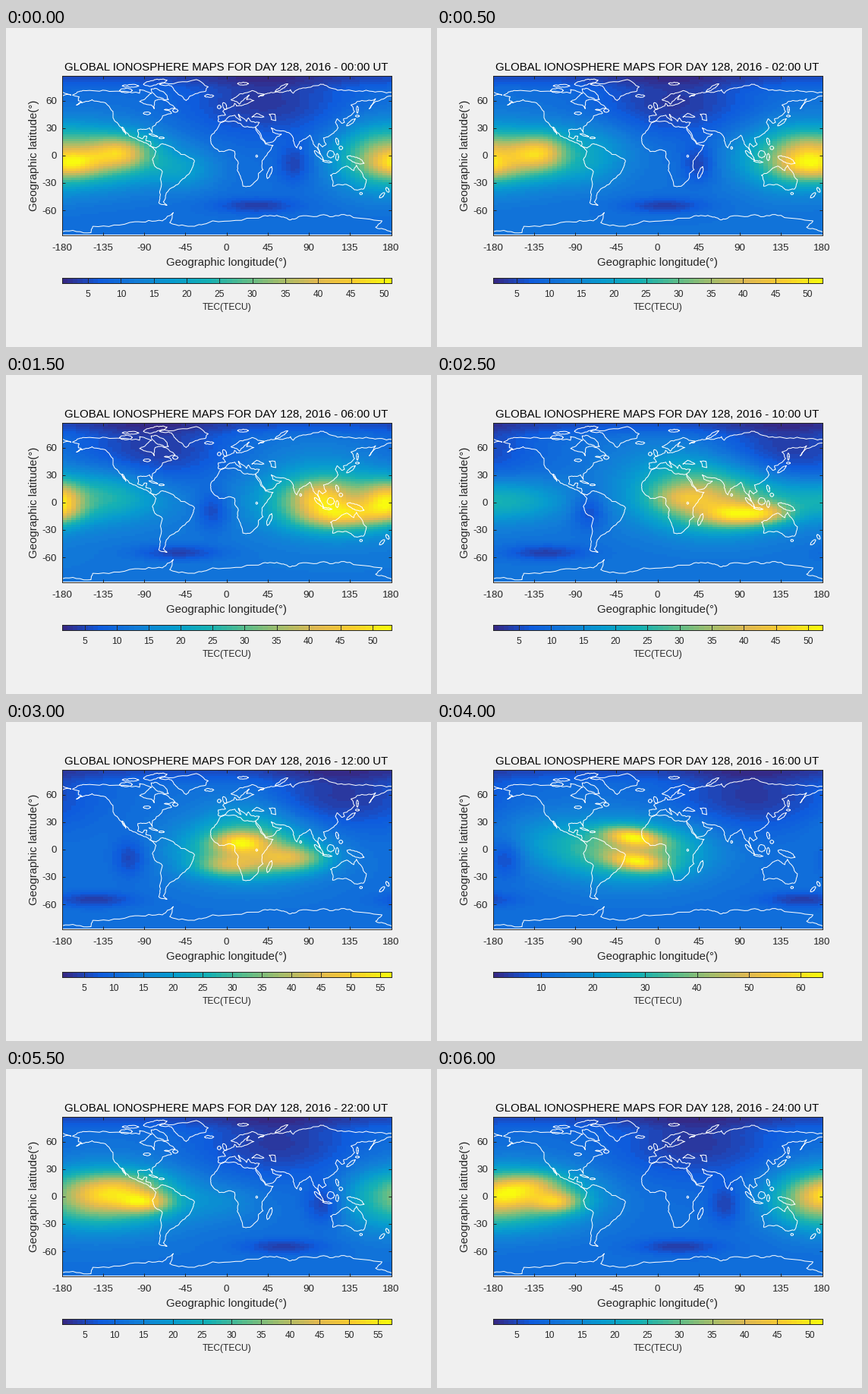
A matplotlib script that plays this animation: 560x420 px, repeating every 6.5 s.

```python
import numpy as np
import matplotlib.pyplot as plt
from matplotlib.animation import FuncAnimation
from matplotlib.colors import LinearSegmentedColormap

W, H, DPI = 560, 420, 100
PX = 72 / DPI
LEFT, RIGHT, TOP, BOTTOM = 73.5, 507.5, 62.5, 272.5
BAR_TOP, BAR_BOTTOM = 328.5, 335.5
INK = "#262626"
plt.rcParams["font.family"] = "Liberation Sans"

PARULA = ["#352a87", "#0f5cdd", "#127dd8", "#079ccf", "#15b1b4",
          "#59bd8c", "#a5be6b", "#e1b952", "#fcce2e", "#f9fb0e"]
CMAP = LinearSegmentedColormap.from_list("parula", PARULA, N=64)

# Colour limits in TECU and longitudes of the moving regions at these hours
HOURS = [0, 4, 10, 12, 16, 20, 24]
LOW = [1.0, 1.6, 0.9, 1.2, 0.7, 0.8, 1.3]
HIGH = [51.1, 53.3, 52.2, 56.8, 64.1, 62.5, 51.9]
DAY = [-145, -215, -300, -340, -385, -460, -505]
NIGHT = [40, -10, -225, -238, -260, -295, -320]
STRIP = [30, -20, -125, -148, -205, -262, -340]
TILT = [0, 0, 0, 0, -.12, 0, 0]

# Crests at each hour: longitude, latitude, two spreads, height
CRESTS = [
    [(-172, -11, 22, 10, 30), (-118, 1, 22, 12, 36),
     (160, -4, 32, 25, 28), (-50, -18, 26, 15, 14)],
    [(-156, 1, 18, 14, 56), (130, 6, 18, 12, 24),
     (142, -17, 28, 10, 32), (-105, 8, 35, 20, 24)],
    [(85, -16, 26, 9, 36), (120, -14, 18, 8, 24), (22, 3, 22, 10, 16),
     (-170, 0, 45, 16, 22), (30, 25, 50, 25, 18)],
    [(12, 6, 20, 8, 36), (0, -20, 24, 8, 28),
     (70, -12, 26, 10, 36), (20, 30, 35, 22, 10)],
    [(-30, 12, 22, 7, 46), (-24, -16, 22, 7, 42), (-110, 5, 45, 22, 14)],
    [(-68, -8, 16, 8, 34), (-85, -7, 30, 11, 18), (-110, 12, 40, 10, 14),
     (25, -8, 28, 14, 14), (180, -5, 20, 25, 18)],
    [(-112, -8, 18, 8, 38), (-140, 12, 25, 9, 24),
     (-168, 0, 24, 10, 20), (165, -5, 32, 22, 32)],
]

LON, LAT = np.meshgrid(np.arange(-180, 180, 5), np.arange(-87.5, 87.5, 2.5))


def bump(lon, lat, wide, tall, height, tilt=0):
    dx = (LON - lon + 180) % 360 - 180
    dy = LAT - lat - tilt * dx
    return height * np.exp(-((dx / wide) ** 2 + (dy / tall) ** 2) / 2)


def crests(k, drift):
    """Crests of hour number k, carried west by drift degrees."""
    return sum(bump(lon - drift, *rest, TILT[k])
               for lon, *rest in CRESTS[k])


def tec(hour):
    """Relative electron content; the crests follow the sun."""
    k = min(np.searchsorted(HOURS, hour, "right") - 1, len(HOURS) - 2)
    start, end = HOURS[k], HOURS[k + 1]
    mix = (hour - start) / (end - start)
    total = (18 + (1 - mix) * crests(k, 15 * (hour - start))
             + mix * crests(k + 1, 15 * (hour - end)))
    day, night, strip = (np.interp(hour, HOURS, track)
                         for track in (DAY, NIGHT, STRIP))
    total += bump(day, -3, 50, 22, 42)
    total += bump(night, 56, 62, 26, -14)
    total += bump(strip, -57, 32, 6, -13)
    total += bump(72 - 15 * hour, -11, 13, 15, -12)
    total -= 10 * np.exp(-((LAT - 86) / 12) ** 2)
    total = np.maximum(total, 0)
    return total / total.max()


fig = plt.figure(figsize=(W / DPI, H / DPI), dpi=DPI, facecolor="#f0f0f0")
rng = np.random.default_rng(4)


def pixel_axes(top, bottom):
    ax = fig.add_axes([LEFT / W, 1 - bottom / H, (RIGHT - LEFT) / W,
                       (bottom - top) / H])
    ax.tick_params(direction="in", top=True, right=True, length=4.3 * PX,
                   width=PX, color=INK, labelbottom=False, labelleft=False)
    for side in ax.spines.values():
        side.set(linewidth=PX, color=INK)
    return ax


def put(x, y, text, size, color=INK, ha="center", va="baseline", **kw):
    return fig.text(x / W, 1 - y / H, text, fontsize=size * PX, color=color,
                    ha=ha, va=va, **kw)


world = pixel_axes(TOP, BOTTOM)
image = world.imshow(tec(0), cmap=CMAP, vmin=0, vmax=1, origin="lower",
                     extent=(-180, 180, -87.5, 87.5), aspect="auto",
                     interpolation="nearest")


def coast(points):
    """Draw a shore, roughened by shifting midpoints sideways."""
    line = np.reshape(points, (-1, 2)).astype(float)
    for _ in range(3):
        step = np.diff(line, axis=0)
        side = np.column_stack([-step[:, 1], step[:, 0]])
        size = np.hypot(*step.T)[:, None] + 1e-9
        shift = rng.uniform(-1, 1, size.shape) * np.minimum(.13, 1.2 / size)
        mids = line[:-1] + step / 2 + side * shift
        rough = np.empty((2 * len(line) - 1, 2))
        rough[::2], rough[1::2] = line, mids
        line = rough
    world.plot(*line.T, color="white", lw=PX)


def island(lon, lat, rx, ry, turn):
    a = np.linspace(0, 2 * np.pi, 9)
    x, y, t = rx * np.cos(a), ry * np.sin(a), np.radians(turn)
    coast(np.column_stack([lon + x * np.cos(t) - y * np.sin(t),
                           lat + x * np.sin(t) + y * np.cos(t)]))


# North America, Arctic to Panama
coast([-168, 66, -157, 71, -128, 70, -95, 68, -95, 72, -82, 68, -87, 64,
       -95, 59, -82, 55, -79, 51, -78, 60, -70, 61, -65, 59, -56, 52, -68, 50,
       -60, 46, -70, 43, -76, 36, -81, 31, -81, 25, -84, 30, -97, 28, -97, 20,
       -92, 18, -90, 21, -87, 21, -88, 16, -83, 15, -83, 10, -77, 8])
# South America
coast([-77, 8, -72, 12, -62, 10, -50, 1, -35, -6, -39, -17, -48, -26, -58, -35,
       -66, -42, -69, -51, -65, -55, -74, -52, -73, -40, -70, -18, -76, -14,
       -81, -5, -77, 4, -80, 8])
# Pacific shore, Panama to Alaska
coast([-80, 8, -87, 13, -95, 16, -106, 21, -114, 31, -110, 23, -118, 34,
       -124, 41, -124, 48, -134, 58, -147, 61, -154, 59, -164, 55, -158, 58,
       -162, 60, -161, 64, -168, 66])
# Africa
coast([32, 31, 20, 31, 10, 37, -6, 36, -17, 21, -17, 14, -8, 4, 4, 6, 9, 4,
       9, -1, 13, -9, 12, -17, 18, -34, 26, -34, 35, -24, 35, -20, 40, -16,
       39, -6, 51, 11, 43, 12, 37, 20, 32, 30])
# Southern and eastern Asia
coast([32, 30, 43, 13, 52, 16, 60, 23, 51, 25, 49, 30, 57, 27, 67, 25, 73, 19,
       77, 8, 80, 15, 91, 22, 94, 16, 98, 9, 103, 1, 100, 9, 101, 13, 105, 9,
       109, 12, 106, 19, 115, 23, 122, 30, 119, 36, 121, 40, 126, 35, 129, 36,
       128, 40, 140, 48, 136, 55, 143, 59, 163, 62, 156, 51, 163, 59, 180, 65])
# Arctic shore and Europe
coast([180, 69, 160, 70, 130, 71, 113, 74, 103, 78, 81, 73, 73, 68, 70, 72,
       60, 69, 45, 68, 35, 64, 41, 67, 28, 71, 14, 67, 5, 61, 11, 59, 14, 56,
       18, 60, 25, 66, 22, 61, 30, 60, 21, 56, 11, 54, 9, 57, 8, 54, -4, 48,
       -1, 44, -9, 43, -9, 37, -5, 36, 4, 43, 9, 44, 16, 38, 13, 45, 22, 37,
       24, 41, 27, 37, 36, 36, 32, 31])
coast([-180, 65, -170, 66, -180, 69])
# Black Sea and Caspian Sea
coast([28, 42, 33, 46, 41, 42, 32, 42, 28, 42])
coast([47, 45, 53, 45, 54, 38, 49, 39, 47, 45])
# Greenland, Australia, Antarctica
coast([-73, 78, -33, 83, -20, 75, -23, 70, -40, 65, -44, 60, -53, 67, -60, 76,
       -73, 78])
coast([114, -22, 116, -34, 131, -32, 140, -38, 150, -37, 153, -27, 142, -11,
       139, -17, 131, -12, 122, -18, 114, -22])
coast([-180, -84, -148, -85, -146, -78, -100, -73, -70, -72, -58, -63, -62, -74,
       -35, -78, -15, -72, 35, -69, 55, -66, 69, -71, 80, -67, 110, -66,
       135, -66, 170, -72, 163, -79, 180, -84])

# Islands and lakes: centre, half axes, turn
ISLANDS = [
    (-2, 54, 2, 4, 20), (-8, 53, 2, 2, 0), (-19, 65, 5, 1.5, 0),
    (47, -19, 2, 7, -20), (176, -38, 1.5, 3, 30), (170, -44, 1.5, 4, -45),
    (136, 36, 6, 1.5, 40), (143, 43, 2, 1, 0), (143, 50, 1, 4, 0),
    (101, 0, 7, 1.7, -45), (110, -7, 5, .8, -8), (114, 1, 4, 4, 0),
    (121, -2, 1.5, 4, 0), (141, -5, 10, 3, -22), (121, 15, 1.5, 4, 15),
    (125, 8, 2, 2, 0), (81, 8, 1, 1.5, 0), (-80, 22, 5, .8, -18),
    (-71, 19, 3, 1, 0), (-56, 49, 3, 2, 0), (-73, 67, 11, 4, -32),
    (-110, 71, 7, 2.5, 0), (-78, 80, 13, 3, 10), (-105, 76, 9, 1.5, 0),
    (18, 78.5, 6, 1.5, 0), (60, 74, 8, 1.5, 32), (147, -42, 1.5, 1.2, 0),
    (-87, 46, 4, 1.5, 0), (33, -1, 1, 1.2, 0)]
for place in ISLANDS:
    island(*place)

world.set(xlim=(-180, 180), ylim=(-87.5, 87.5),
          xticks=range(-180, 181, 45), yticks=range(-60, 61, 30))
for lon in range(-180, 181, 45):
    put(LEFT + (lon + 180) * (RIGHT - LEFT) / 360, 293, str(lon), 13.33)
for lat in range(-60, 61, 30):
    put(67, 172.5 - lat * (BOTTOM - TOP) / 175, str(lat), 13.33, ha="right")

bar = pixel_axes(BAR_TOP, BAR_BOTTOM)
bar.imshow(np.arange(64)[None, :], cmap=CMAP, extent=(0, 1, 0, 1),
           aspect="auto", interpolation="nearest")
bar.tick_params(length=3.5 * PX)
bar.set_yticks([])

title = put(290.5, 56, "", 15, "black")
put(290.5, 313, "Geographic longitude(°)", 15)
put(44.5, 168, "Geographic latitude(°)", 15, ha="right", va="center",
    rotation=90)
put(291, 371, "TEC(TECU)", 12)
bar_labels = []


def update(i):
    hour = 2 * i
    title.set_text(
        f"GLOBAL IONOSPHERE MAPS FOR DAY 128, 2016 - {hour:02d}:00 UT")
    image.set_data(tec(hour))
    low, high = np.interp(hour, HOURS, LOW), np.interp(hour, HOURS, HIGH)
    step = 5 if high - low < 59 else 10
    values = np.arange(step, high, step)
    spots = (values - low) / (high - low)
    bar.set_xticks(spots)
    while bar_labels:
        bar_labels.pop().remove()
    for value, spot in zip(values, spots):
        bar_labels.append(put(LEFT + spot * (RIGHT - LEFT), 354,
                              f"{value:.0f}", 12))
    return [image, title, *bar_labels]


anim = FuncAnimation(fig, update, frames=13, interval=500, repeat=True,
                     repeat_delay=0, blit=False)
plt.show()
```
